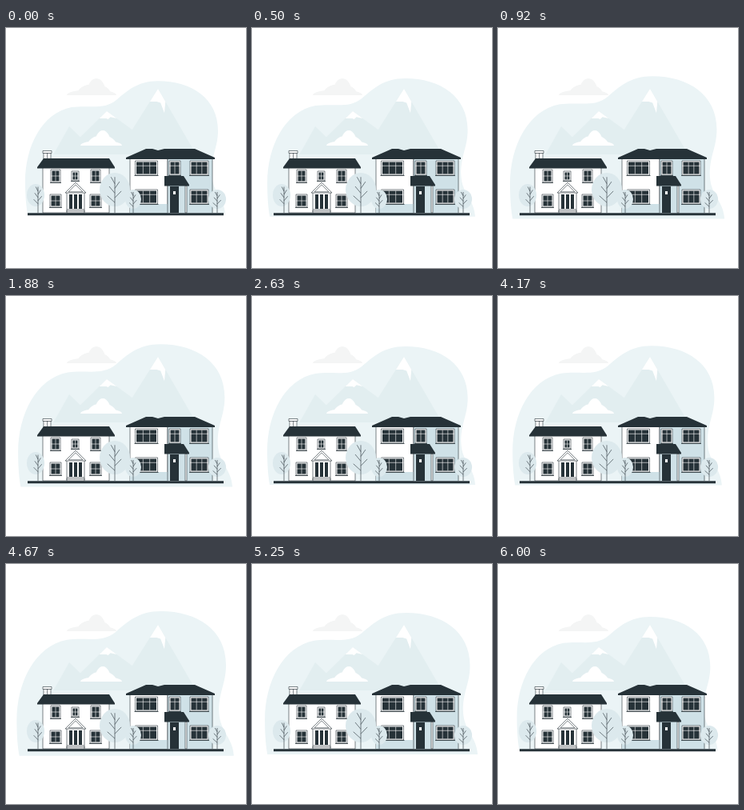
Write an HTML page that moves like this. It is 300 px wide and 300 px high and loops after 6040 ms.

```html
<!DOCTYPE html>
<html lang="en">
<head>
<meta charset="utf-8">
<title>Two houses</title>
<style>
html, body { margin: 0; width: 100%; height: 100%; overflow: hidden; background: #fff; }
svg { display: block; width: 100vw; height: 100vh; }
.dark { fill: #263238; }
.pale { fill: #cfe1e7; }
.bush { fill: #dce9ed; }
.hill { fill: #e2eef0; }
.grey { fill: #f4f5f5; }
.white { fill: #fff; }
.line { fill: none; stroke: #263238; stroke-width: .6; }
.box { fill: #fff; stroke: #263238; stroke-width: .6; }
.bars { stroke: #fff; stroke-width: .6; }
</style>
</head>
<body>
<svg viewBox="0 0 300 300">
  <path id="blob" fill="#ebf4f6" d="M27 232.6C25 222 24 208 24 192C24 148 45 106 82 99C105 96 122 103 138 90C151 79 164 66.2 190 66.2C232 66.2 265 88 265 128C265 150 256 160 257 183C258 205 273 212 274 232.6Z"/>
  <g id="scene"></g>
</svg>
<script>
const get = id => document.getElementById(id);
const path = (cls, d) => `<path class="${cls}" d="${d}"/>`;
const rect = (cls, x, y, w, h) => path(cls, `M${x} ${y}h${w}v${h}h${-w}z`);

// Slopes are given as sideways run per unit of height
function peak(x, y, left, right, snow) {
  const h = 158 - y, drip = snow * 1.1 / right;
  return path('hill', `M${x} ${y}l${right * h} ${h}H${x - left * h}z`) +
    path('white', `M${x} ${y}l${right * snow} ${snow}L${x + snow * .5} ${y + drip}
      L${x + snow * .2} ${y + snow * 1.1}L${x - snow * .1} ${y + snow}L${x - left * snow} ${y + snow}z`);
}

// Stacked half ellipses, narrower and taller towards the top
function cloud(cls, x, base, w, h, shift) {
  let d = '';
  for (let k = 0; k < 3; k++) {
    const rx = w * (1 - .3 * k);
    d += `M${x + shift * k - rx} ${base}a${rx} ${h * (k + 1) / 3} 0 0 1 ${2 * rx} 0z`;
  }
  return path(cls, d);
}

// Window centred on cx, with its crossbar at a share of the height
function sash(cx, y, w, h, cols, split) {
  const x = cx - w / 2, pad = 1.5, gw = w - 2 * pad, gh = h - 2 * pad;
  let bars = `M${x} ${y + h * split}h${w}`;
  for (let i = 1; i < cols; i++) bars += `M${x + pad + gw * i / cols} ${y + pad}v${gh}`;
  return rect('box', x, y, w, h) + rect('dark', x + pad, y + pad, gw, gh) +
    path('bars', bars) + rect('dark', x - 1, y + h, w + 2, .8);
}

// Branches alternate sides and shorten towards the top
function tree(x, cy, rx, ry, lean = 0) {
  const top = cy - ry * .75;
  let d = `M${x} 231V${top}`;
  for (let i = 0; i < 5; i++) {
    const reach = (i % 2 ? 1 : -1) * rx * (.25 + .06 * i);
    d += `M${x} ${top + ry * (.4 + .28 * i)}l${reach} ${-ry * .4}`;
  }
  return `<ellipse class="bush" cx="${x - lean}" cy="${cy}" rx="${rx}" ry="${ry}"/>` + path('line', d);
}

function leftHouse() {
  const mid = 87;
  let out = rect('box', 46, 174, 83, 57) +
    rect('box', 47, 156, 9, 9) + rect('box', 46, 153.5, 11, 3) + path('line', 'M51.5 156v8') +
    path('dark', 'M47 163H129L136 174V175.5H39V174z') +
    sash(mid - .5, 179, 9, 12, 2, .5);
  for (const side of [-1, 1]) {
    out += sash(mid + 25 * side, 177, 12, 16, 2, .5) + sash(mid + 25 * side, 208, 14, 16, 2, .5);
  }
  out += rect('box', 76, 205, 22, 26);
  for (let i = -1; i <= 1; i++) out += rect('dark', mid + 6 * i - 2, 208, 4, 18);
  for (const inset of [0, 4]) {
    out += path('box', `M${mid} ${193 + inset * .7}L${100 - inset} ${206 - inset * .3}H${74 + inset}z`);
  }
  return out + path('line', 'M76 227h22M75 229h24');
}

function rightHouse() {
  let out = rect('box', 155, 163, 47, 68) + rect('pale', 155, 220, 47, 11) +
    rect('pale', 202, 163, 56, 68) + path('line', 'M202 163v68M258 163v68') +
    path('dark', 'M150 162L175 151H183L190 153L198 151H236L261 162V164H150z') +
    sash(211, 166, 14, 18, 2, .35);
  for (const y of [166, 202]) out += sash(175.5, y, 28, 18, 3, .35) + sash(241.5, y, 23, 18, 3, .35);
  return out + rect('dark', 205, 198, 11, 33) + rect('white', 209, 204, 3, 4) +
    rect('box', 224, 197, 2, 34) + path('dark', 'M198 185H222L229 196V197.5H198z');
}

get('scene').innerHTML =
  peak(79, 123, .56, 1.03, 0) + peak(126, 104, 1.02, 1.37, 9) + peak(190, 76, .63, .58, 16) +
  cloud('grey', 107, 84, 31, 21, 3) + cloud('white', 119, 147, 26, 19, 1) +
  leftHouse() + rightHouse() +
  tree(40, 209, 11, 14, 3) + tree(136, 202, 19, 21) + tree(159, 214, 10, 12) + tree(264, 214, 11, 12) +
  rect('dark', 27, 231.3, 245, 2.9);

// The blob swells twice per loop; the first swell settles more slowly
const LOOP = 6040, SECOND = 3580, RISE = 1250;
const pulse = (t, length) => t < RISE ? t / RISE : (length - t) / (length - RISE);
const swell = t => t < SECOND ? pulse(t, SECOND) : pulse(t - SECOND, LOOP - SECOND);

function draw() {
  const scale = 1 + .098 * swell(performance.now() % LOOP);
  get('blob').setAttribute('transform', `translate(148 149.5) scale(${scale}) translate(-148 -149.5)`);
  requestAnimationFrame(draw);
}
draw();
</script>
</body>
</html>
```
